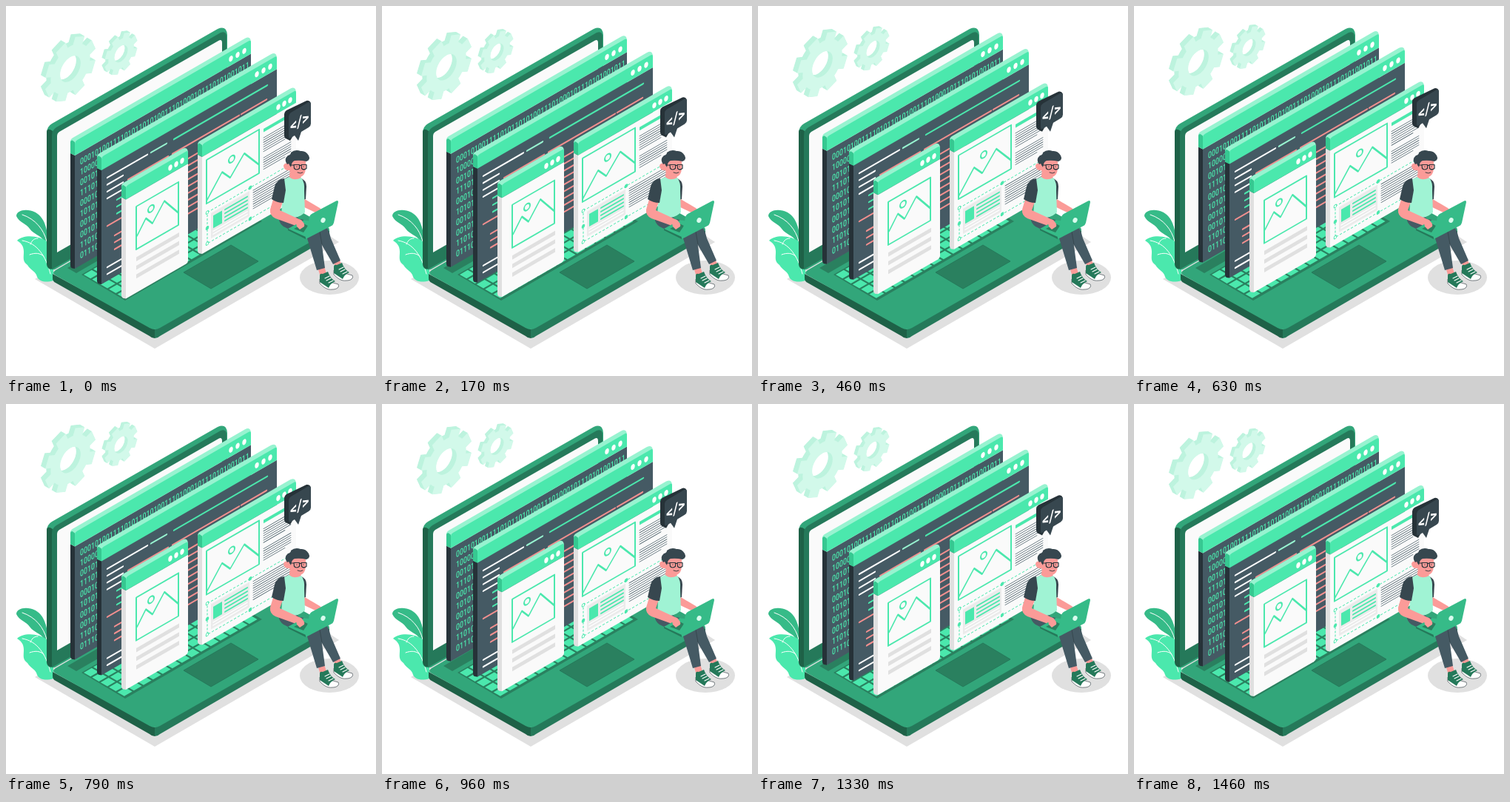
An HTML page that plays this animation: 500 px wide and 500 px high, repeating every 1500 ms.

```html
<!DOCTYPE html>
<html lang="en">
<head>
<meta charset="utf-8">
<title>Isometric web development</title>
<style>
  html, body { margin: 0; width: 100%; height: 100%; overflow: hidden; background: #fff; }
  svg { display: block; width: 100vw; height: 100vh; }
  text { font-family: Roboto, Arial, sans-serif; white-space: pre; }
</style>
</head>
<body>
<svg id="stage" viewBox="0 0 500 500"></svg>
<script>
const MINT = '#4be8ad', PALE = '#97f3d0', LEAF = '#36bb88', GREEN = '#32a67a';
const DEEP = '#25795a', SHADE = '#2a805f', FOREST = '#1e6147';
const SLATE = '#455a64', DARK = '#37474f', INK = '#263238', GREY = '#e0e0e0', PAPER = '#fafafa';
const SALMON = '#f28f8f', SKIN = '#fb9b98', WHITE = '#fff';

const path = (fill, d, extra = '') => `<path fill="${fill}" d="${d}" ${extra}/>`;
const stroke = (color, width, d, extra = '') =>
  path('none', d, `stroke="${color}" stroke-width="${width}" stroke-linecap="round" stroke-linejoin="round" ${extra}`);
const rect = (fill, x, y, w, h) => `<rect fill="${fill}" x="${x}" y="${y}" width="${w}" height="${h}"/>`;
const oval = (fill, x, y, rx, ry, extra = '') =>
  `<ellipse fill="${fill}" cx="${x}" cy="${y}" rx="${rx}" ry="${ry}" ${extra}/>`;
const rows = (n, draw) => Array.from({ length: n }, (_, i) => draw(i)).join('');
const iso = (x, y, content) => `<g transform="translate(${x} ${y}) skewY(-30)">${content}</g>`;
const float = (rise, content) => `<g class="float" data-rise="${rise}">${content}</g>`;

// Upright window; local x runs along the isometric axis, local y straight down
function panel(x, y, w, h, head, face, side, dots, content) {
  return float(10, iso(x, y,
    path(PALE, `M-6 ${head}V-3Q-6 -6.5 -3 -6.5H${w - 8}Q${w} -6 ${w} 4L0 8Z`) +
    path(side, `M-6 ${head - 6.5}L0 ${head}V${h}L-4 ${h - 3}Q-6 ${h - 5} -6 ${h - 8}Z`) +
    path('#36c891', `M-6 -3Q-5 -5 -3 -3L0 1V${head}L-6 ${head - 6.5}Z`) +
    path(face, `M0 ${head}H${w}V${h - 3}Q${w} ${h} ${w - 3} ${h}H0Z`) +
    path(MINT, `M0 ${head}V3Q0 0 3 0H${w - 3}Q${w} 0 ${w} 3V${head}Z`) +
    rows(3, i => oval(WHITE, w - dots * (i + 1), head / 2 + .5, 2.7, 3.8)) + content));
}

function picture(x, y, w, h, sun, peaks) {
  return stroke(MINT, 2, `M${x} ${y}h${w}v${h}h${-w}Z`) + stroke(MINT, 2, peaks) +
    oval('none', ...sun, 4, 4.3, `stroke="${MINT}" stroke-width="2"`);
}

function gear(x, y, r, depth) {
  const at = (radius, a) => `${(radius * Math.cos(a)).toFixed(1)} ${(radius * Math.sin(a)).toFixed(1)}`;
  const root = r * .77, hole = r * .4;
  let d = '';
  for (let i = 0; i < 8; i++) {
    const a = (i + .5) * Math.PI / 4;
    d += `${i ? 'L' : 'M'}${at(root, a - .26)}L${at(r, a - .2)}L${at(r, a + .2)}L${at(root, a + .26)}` +
      `A${root} ${root} 0 0 1 ${at(root, a + Math.PI / 4 - .26)}`;
  }
  d += `ZM${hole} 0A${hole} ${hole} 0 1 0 ${-hole} 0A${hole} ${hole} 0 1 0 ${hole} 0Z`;
  const layer = (k, fill) =>
    `<g transform="matrix(.866 -.5 0 1 ${x - k} ${y - k * .577})">${path(fill, d, 'fill-rule="evenodd"')}</g>`;
  return float(10, rows(depth * 2, i => layer(depth - i / 2, '#bdf3de')) + layer(0, '#d2f9ea'));
}

function plant() {
  return path(LEAF, 'M14 284C14 276 28 273 40 279C54 287 58 306 58 340L52 318C46 309 38 309 32 301C28 294 18 293 14 284Z') +
    path(MINT, 'M15 317C23 309 44 309 58 320L64 345V371C55 374 45 373 42 366C40 358 34 358 29 350C22 345 24 340 24 332C24 324 20 320 15 317Z') +
    stroke(WHITE, 1, 'M22 282C40 288 51 302 55 318M22 317C42 320 54 338 60 362M32 336C40 333 46 334 51 338M33 322C35 316 39 314 43 314');
}

function keyboard() {
  const key = (r, c) => {
    const x = 105 + r * 11.4 + c * 13, y = 363 + r * 6.6 - c * 7.5;
    return path(MINT, `M${x} ${y}l10.8 -6.2l9.2 5.3l-10.8 6.2Z`);
  };
  return path(SHADE, 'M83 354L270 246L282 253L95 361Z') +
    path(SHADE, 'M102 363L287 256L346 291L161 398Z') +
    rows(5, r => rows(14, c => key(r, c)));
}

function laptop() {
  return path(GREY, 'M39 369L70 351L300 220L450 319L201 463Z') +
    plant() +
    path(GREEN, 'M55 349V172Q55 163 62 159L286 31Q298 26 299 39V222L66 356Q56 358 55 349Z') +
    path(DEEP, 'M62 175Q62 168 68 164L290 36Q298 33 298 42V222L62 356Z') +
    path(FOREST, 'M55 170Q56 164 63 169L62 175V355Q56 356 55 349Z') +
    path(PAPER, 'M69 176Q69 172 72 170L287 47Q292 44 292 50V205L69 333Z') +
    path(DEEP, 'M201 437L437 303V313L208 446Q205 449 201 449Z') +
    path(FOREST, 'M63 362L201 437V449Q197 449 194 446L67 374Q63 372 63 368Z') +
    path(GREEN, 'M67 357L299 222L434 298Q440 302 434 306L208 435Q201 439 194 435L67 364Q61 361 67 357Z') +
    keyboard() +
    path(SHADE, 'M240 360L304 323L341 345L277 382Z', `stroke="${DEEP}"`);
}

function binary() {
  const lines = ['0001010011110101101010011101000101110101001011', '100001', '001011', '111010', '000101',
    '101010', '001011', '001010', '110100', '011101'];
  return `<g fill="${MINT}" font-size="12" font-weight="500">` + rows(lines.length, i =>
    `<text transform="translate(7 ${36 + i * 14.1}) scale(.73 1)">${lines[i]}</text>`) + '</g>';
}

function code() {
  const line = (row, from, to, color) => stroke(color, 2.3, `M${from} ${32.6 + row * 9.3}H${to}`);
  const run = (first, count, from, to, color) => rows(count, i => line(first + i, from, to, color));
  return line(0, 8, 62, WHITE) + line(0, 67, 88, PALE) + line(0, 98, 224, MINT) +
    run(1, 2, 8, 29, WHITE) +
    line(2, 36, 90, SALMON) + line(2, 96, 186, SALMON) + line(2, 189, 223, SALMON) +
    line(3, 8, 60, WHITE) + run(4, 3, 21, 70, MINT) +
    line(7, 8, 60, SALMON) + run(9, 3, 18, 70, SALMON) +
    run(4, 9, 90, 150, SALMON) + run(13, 2, 8, 60, WHITE);
}

function article() {
  const text = (n, x, y) =>
    rows(n, i => stroke(SLATE, .8, `M${x} ${y + i * 3.1}H${i === n - 1 ? 112 : 120}`));
  const handles = [[7, 96], [7, 138], [65, 96], [65, 138], [7, 117]];
  return picture(6, 24.5, 71, 59, [40, 43], 'M6 80L27 53L38 67L57 45L77 72') +
    rect(MINT, 83, 27, 32, 4.5) + text(7, 83, 39) + text(6, 83, 66) + text(9, 69, 102) +
    rect('#ebebeb', 12, 100, 52, 34) + rect(MINT, 15, 105, 12, 17) +
    rows(4, i => stroke(MINT, 2, `M31 ${106 + i * 5}H61`)) +
    rows(2, i => stroke(WHITE, 1.5, `M15 ${126 + i * 4}H61`)) +
    path('none', 'M7 96H123V138H7Z', `stroke="${MINT}" stroke-dasharray="3 2"`) +
    handles.map(([x, y], i) => oval(i < 2 ? WHITE : MINT, x, y, 1.8, 2, `stroke="${MINT}"`)).join('');
}

function card() {
  return picture(14, 35.5, 57, 58, [34, 50], 'M15 76L27 59L36 71L52 50L71 77') +
    rows(3, i => rect(GREY, 14, 104 + i * 11.7, 58, 5.5));
}

function bubble() {
  return float(20,
    path(INK, 'M376 146Q376 143 379 141L406 128Q412 127 412 134L384 182L378 179Q376 178 376 175Z') +
    path(DARK, 'M382 149Q382 146 385 144L408 130.5Q412 128.5 412 133V159Q412 162 409 164L399 170L395 182L390 175L385 178Q382 180 382 176Z') +
    `<text transform="matrix(.866 -.5 0 1 384 170.500)" font-size="21" font-weight="700" fill="#fff">&lt;/&gt;</text>`);
}

function shoe(x, y) {
  return `<g transform="translate(${x} ${y})">` +
    path(WHITE, 'M0 8L0 14C5 19 10 23 17 22C23 22 27 19 25 15Z', `stroke="${INK}" stroke-width=".6"`) +
    path(DEEP, 'M0 3Q0 0 4 1L11 -2Q14 7 21 11Q14 14 12 20L0 12Z') +
    stroke(WHITE, 1.1, 'M7 7L13 4M9 10L15 7M12 13L18 10') + '</g>';
}

function person() {
  return oval(GREY, 437, 367, 40, 23) +
    path(SKIN, 'M421 353L430 352L434 364L425 366ZM442 345L450 342L455 352L446 355Z') +
    shoe(424, 361) + shoe(443, 349) +
    path(SLATE, 'M398 288L428 295Q436 299 439 314L452 344L442 349L424 318L395 304Z') +
    path(SLATE, 'M369 283Q367 292 375 298L407 314L420 357L431 354L425 309Q421 298 400 292L390 282Z') +
    stroke(DARK, 1, 'M424 305L427 322') +
    path(SKIN, 'M402 260L424 273Q428 276 426 279L418 279L399 270Z') +
    path(DARK, 'M397 232Q406 235 406 244L405 261L397 263Z') +
    path(SKIN, 'M384 222L398 224L399 238Q390 241 382 236Z') +
    path('#a0f3d4', 'M374 235L383 231Q389 237 399 232Q404 238 403 250L404 279Q392 290 371 286Q375 266 371 250Z') +
    path(SKIN, 'M362 258L375 262L370 276L396 288Q403 290 403 297L396 301L389 296L364 287Q356 283 357 275Z') +
    path(DARK, 'M376 233Q366 234 363 244L359 261Q366 266 375 266L378 249Z') +
    path(SKIN, 'M382 205Q396 198 405 210Q406 222 403 227Q399 233 392 230Q385 228 383 222Q376 223 375 216Q376 211 382 213Z') +
    path(DARK, 'M380 214Q375 207 381 202Q385 201 385 198Q391 193 398 196Q405 195 409 202Q412 208 406 210Q398 208 390 209Q386 210 385 218L382 213Z') +
    stroke(INK, 1.2, 'M384 215L389 215M389 214.5h7.5v5q-4 3 -7 0ZM399 214.5h7v5q-4 3 -6.5 0ZM396.5 215.5h2.5') +
    stroke(INK, .9, 'M393 217v.6M402 217v.6M394 225Q398 227 401 225') +
    stroke(SALMON, .9, 'M398 217L399 222L397 222') +
    path(LEAF, 'M381 301L403 289L413 291L405 314Z') +
    path(DEEP, 'M381 301L405 312V315L381 303Z') +
    path(SHADE, 'M389 301L402 294L408 297L402 306Z') +
    path(SKIN, 'M391 289L399 290Q404 293 403 298L397 302L393 298Z') +
    path(LEAF, 'M410 285Q411 282 413 281L446 263.5Q449 262 449 265L443 293Q442 296 440 297L407 314Q404 315 405 311Z') +
    oval('#d9fbee', 428.5, 289.5, 3, 3.6, 'transform="rotate(25 428.5 289.5)"');
}

const stage = document.getElementById('stage');
stage.innerHTML = laptop() +
  gear(87, 85, 40, 6) + gear(155.5, 64.5, 26, 4) +
  panel(93, 183, 238, 172, 19, SLATE, INK, 9, binary()) +
  panel(129, 204, 237, 172, 18, SLATE, INK, 9, code()) +
  panel(265, 187, 127, 148, 17, PAPER, GREY, 8, article()) +
  panel(162, 243.5, 84, 152, 18, PAPER, GREY, 8, card()) +
  person() + bubble();

const floats = [...stage.querySelectorAll('.float')];
const PERIOD = 1500;

function draw(now) {
  const phase = now % PERIOD / PERIOD;
  const lift = 1 - Math.abs(1 - 2 * phase);
  for (const el of floats) el.setAttribute('transform', `translate(0 ${-el.dataset.rise * lift})`);
  requestAnimationFrame(draw);
}
draw(performance.now());
</script>
</body>
</html>
```
